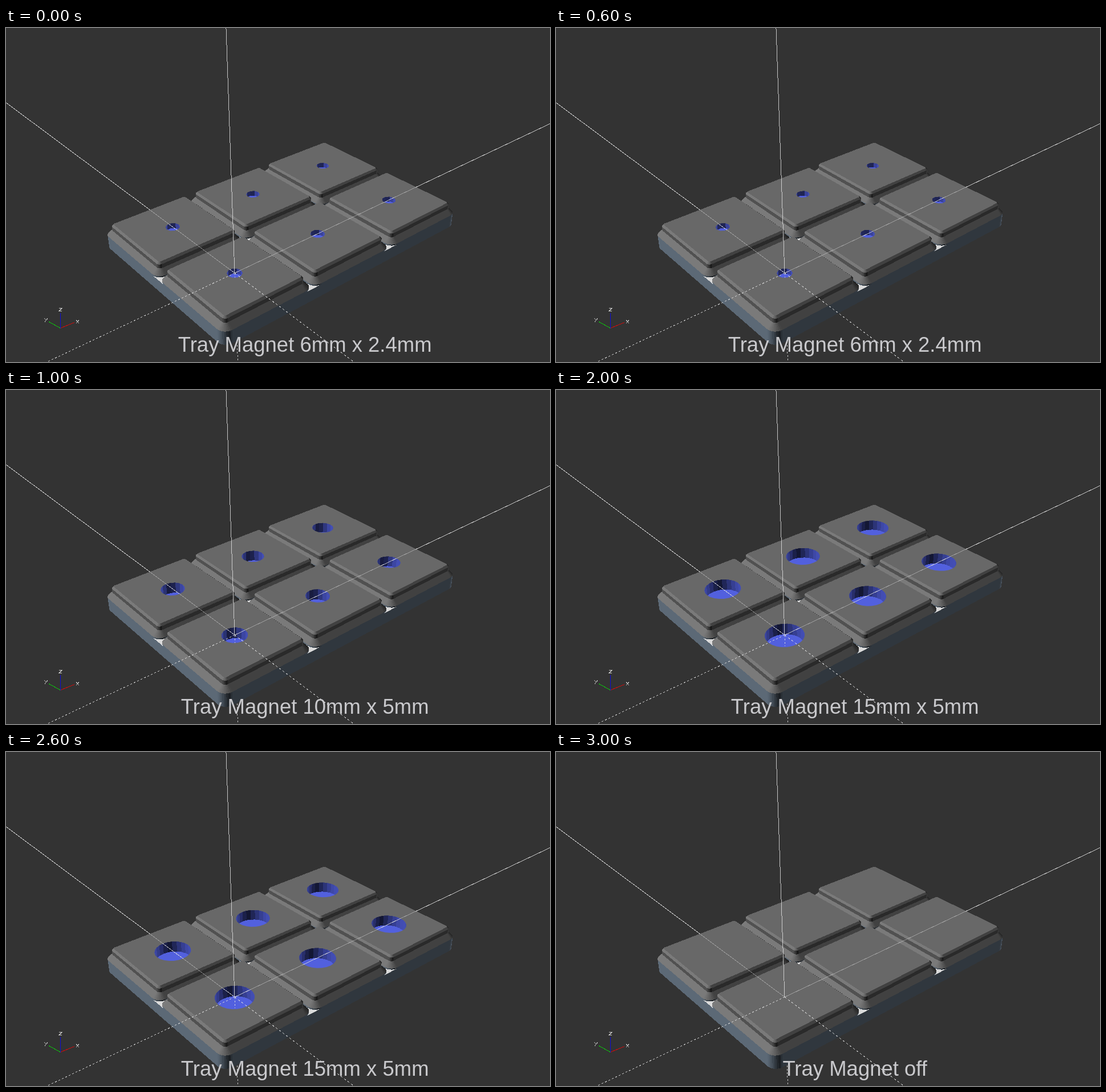
Recreate the animation shown at these times as an HTML page. Size 954 px wide and 587 px high, loop 4 s.

```html
<!DOCTYPE html>
<html lang="en">
<head>
<meta charset="utf-8">
<title>Tray magnet sizes</title>
<style>
  html, body { margin: 0; width: 100%; height: 100%; overflow: hidden; background: #333; }
  svg { display: block; width: 100%; height: 100%; }
  polygon, line { shape-rendering: crispEdges; }
  text { font: 36.5px "Liberation Sans", Arial, sans-serif; fill: #c9c9cc; text-anchor: middle; }
</style>
</head>
<body>
<svg id="stage" viewBox="0 0 954 587" xmlns="http://www.w3.org/2000/svg"></svg>
<script>
const GRID = 42;
const PAD = [105, 105, 105], BODY = [119, 136, 153], HOLE = [83, 97, 224];
const FLOOR_Z = -5.3, BASE_Z = -10.7;
const STEP = 1000;
const STATES = [
  { label: "Tray Magnet 6mm x 2.4mm", d: 6, depth: 2.4 },
  { label: "Tray Magnet 10mm x 5mm", d: 10, depth: 5 },
  { label: "Tray Magnet 15mm x 5mm", d: 15, depth: 5 },
  { label: "Tray Magnet off" }
];
// pad profile: half width, corner radius, height
const PROFILE = [
  [20.75, 3.75, FLOOR_Z], [20.75, 3.75, -4.75], [18.6, 1.6, -2.6], [18.6, 1.6, -0.8], [17.8, 0.8, 0]
];
// colour and upward tilt of the bands between those outlines
const BANDS = [[BODY, 0], [PAD, Math.SQRT1_2], [PAD, 0], [PAD, Math.SQRT1_2]];
// columns and rows, farthest first
const CELLS = [[2, 1], [1, 1], [2, 0], [0, 1], [1, 0], [0, 0]];

const stage = document.getElementById("stage");

function add(parent, tag, attrs) {
  const el = document.createElementNS("http://www.w3.org/2000/svg", tag);
  for (const k in attrs) el.setAttribute(k, attrs[k]);
  parent.appendChild(el);
  return el;
}

// perspective camera, millimetres to pixels
function project([x, y, z]) {
  const u = x / GRID, v = y / GRID, h = z / GRID;
  const w = 1 + 0.082 * u + 0.101 * v - 0.0755 * h;
  return [(401 + 190.3 * u - 79 * v - 35.9 * h) / w,
          (430.7 - 39.41 * u - 45.77 * v - 193.4 * h) / w];
}

const coords = pts => pts.map(p => p.map(n => n.toFixed(2)).join()).join(" ");

function shade(color, nx, ny, nz) {
  const s = 0.2 + Math.abs(-0.574 * nx + 0.203 * ny + 0.789 * nz);
  return `rgb(${color.map(c => Math.min(255, Math.round(c * s)))})`;
}

function face(parent, pts, fill) {
  add(parent, "polygon", { points: coords(pts), fill });
}

function area(pts) {
  return pts.reduce((sum, [x, y], i) => {
    const [a, b] = pts[(i + 1) % pts.length];
    return sum + x * b - a * y;
  }, 0);
}

function roundRect(cx, cy, hx, hy, r, z, n = 8) {
  const pts = [];
  [[1, 1], [-1, 1], [-1, -1], [1, -1]].forEach(([sx, sy], q) => {
    for (let i = 0; i <= n; i++) {
      const a = (q + i / n) * Math.PI / 2;
      pts.push([cx + sx * (hx - r) + r * Math.cos(a), cy + sy * (hy - r) + r * Math.sin(a), z]);
    }
  });
  return pts;
}

function circle(cx, cy, r, z) {
  const n = Math.max(10, Math.ceil(Math.PI * r));
  return Array.from({ length: n }, (_, i) => {
    const a = i / n * 2 * Math.PI;
    return [cx + r * Math.cos(a), cy + r * Math.sin(a), z];
  });
}

// strip of facets between two outlines; side -1 shows the inner surface
function band(parent, low, high, color, nz, side = 1) {
  low.forEach((a, i) => {
    const j = (i + 1) % low.length, b = low[j];
    const quad = [a, b, high[j], high[i]].map(project);
    if (area(quad) * side >= 0) return;
    const dx = b[0] - a[0], dy = b[1] - a[1];
    const k = side * Math.sqrt(1 - nz * nz) / Math.hypot(dx, dy);
    face(parent, quad, shade(color, dy * k, -dx * k, nz));
  });
}

function axis(parent, from, to, opacity, dash) {
  const [[x1, y1], [x2, y2]] = [project(from), project(to)];
  const attrs = { x1, y1, x2, y2, stroke: "#e0e0e0", "stroke-width": 1, "stroke-opacity": opacity };
  if (dash) {
    const dx = Math.abs(x2 - x1), dy = Math.abs(y2 - y1);
    attrs["stroke-dasharray"] = 3 * Math.hypot(dx, dy) / Math.max(dx, dy);
  }
  return add(parent, "line", attrs);
}

function drawTray(parent) {
  const outline = z => roundRect(GRID, GRID / 2, 62.75, 41.75, 3.75, z);
  const top = outline(FLOOR_Z);
  band(parent, outline(BASE_Z), top, BODY, 0);
  face(parent, top.map(project), "#dadada");
  for (const [c, r] of CELLS) {
    const rings = PROFILE.map(([h, rad, z]) => roundRect(c * GRID, r * GRID, h, h, rad, z));
    BANDS.forEach(([color, nz], i) => band(parent, rings[i], rings[i + 1], color, nz));
    face(parent, rings.at(-1).map(project), shade(PAD, 0, 0, 1));
  }
}

function drawHoles(parent, { d, depth }) {
  CELLS.forEach(([c, r], i) => {
    const x = c * GRID, y = r * GRID, id = `hole${d}-${i}`;
    const rim = circle(x, y, d / 2, 0), floor = circle(x, y, d / 2, -depth);
    const clip = add(parent, "clipPath", { id });
    add(clip, "polygon", { points: coords(rim.map(project)) });
    const g = add(parent, "g", { "clip-path": `url(#${id})` });
    face(g, floor.map(project), shade(HOLE, 0, 0, 1));
    band(g, floor, rim, HOLE, 0, -1);
    if (!c && !r) axis(g, [0, 0, 0], [0, 0, -depth], 0.85, true);
  });
}

function drawAxes(parent, d = 0) {
  const tip = 2 * GRID + 17.8, side = GRID + 17.8;
  axis(parent, [0, 0, 0], [0, 0, 110], 0.85);
  axis(parent, [tip, 0, 0], [300, 0, 0], 0.85);
  axis(parent, [0, side, 0], [0, 300, 0], 0.85);
  axis(parent, [0, 0, 0], [tip, 0, 0], 0.45);
  axis(parent, [0, 0, 0], [0, side, 0], 0.4);
  axis(parent, [0, 0, 0], [-90, 0, 0], 0.85, true);
  axis(parent, [0, 0, 0], [0, -76, 0], 0.85, true);
  if (!d) return;
  const r = d / 2;
  for (const c of [0, GRID, 2 * GRID]) axis(parent, [Math.max(0, c - r), 0, 0], [c + r, 0, 0], 0.6);
  for (const c of [0, GRID]) axis(parent, [0, Math.max(0, c - r), 0], [0, c + r, 0], 0.6);
}

function drawGizmo(parent) {
  const line = (d, stroke) => add(parent, "path", {
    d, stroke, fill: "none", "stroke-width": 1, "shape-rendering": "crispEdges"
  });
  line("M95.5 527.5L120 517.5", "#d00c0c");
  line("M95.5 527.5L75.5 516.5", "#0cc80c");
  line("M95.5 527.5V501", "#0c0cd8");
  line("M123 513.5l5 5.5m0 -5.5l-5 5.5"
    + "M67.5 510.5l2.7 3m2.8 -3l-5 6"
    + "M93 492.5h5l-5 5h5", "#c4c4c4");
}

add(stage, "rect", { width: 954, height: 587, fill: "#333" });
axis(stage, [0, 0, 0], [0, 0, -46], 0.85, true);
drawTray(stage);
drawGizmo(stage);
const layers = STATES.map(state => {
  const g = add(stage, "g", { visibility: "hidden" });
  if (state.d) drawHoles(g, state);
  drawAxes(g, state.d);
  add(g, "text", { x: 524.2, y: 569 }).textContent = state.label;
  return g;
});

function show(time) {
  const now = Math.floor(time / STEP) % layers.length;
  layers.forEach((g, i) => g.setAttribute("visibility", i === now ? "visible" : "hidden"));
}

const start = performance.now();
function tick(time) {
  show(Math.max(0, time - start));
  requestAnimationFrame(tick);
}
show(0);
requestAnimationFrame(tick);
</script>
</body>
</html>
```
